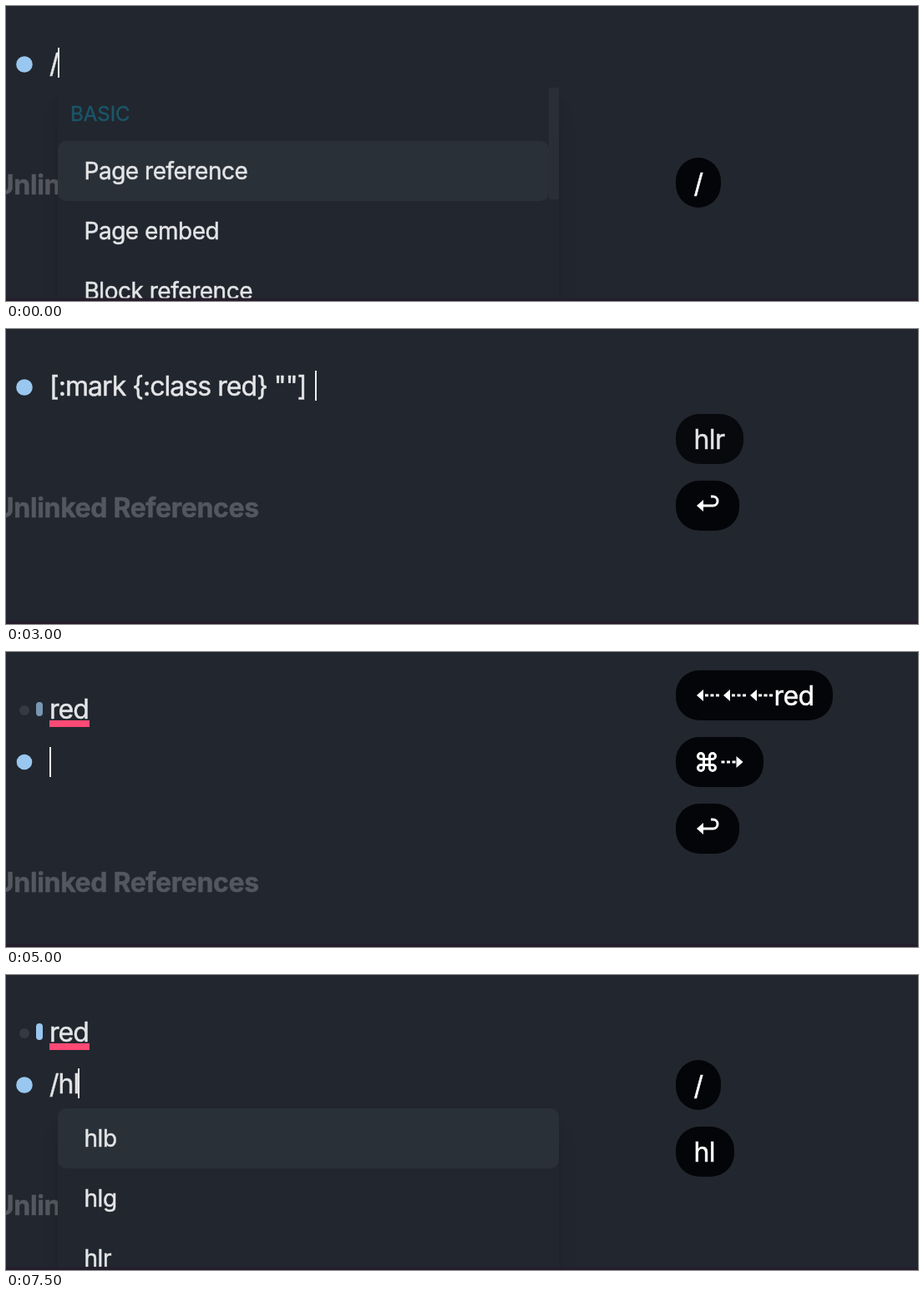
Recreate the animation shown at these times as an HTML page. Size 1092 by 354 pixels, loop 8 s.

```html
<!DOCTYPE html>
<html lang="en">
<head>
<meta charset="utf-8">
<title>Slash command typing</title>
<style>
  html, body { margin: 0; width: 100%; height: 100%; overflow: hidden; background: #22262e; }
  svg { display: block; width: 1092px; height: 354px; }
  text {
    font: 32px Inter, sans-serif; font-optical-sizing: none;
    letter-spacing: -.03em; white-space: pre;
    color: #e4e5e7; fill: currentColor; stroke: currentColor; stroke-width: .5px;
  }
  .item { font-size: 28px; letter-spacing: -.017em; }
  .group { font-size: 24px; letter-spacing: 0; color: #1b5568; }
  .heading { font-weight: 700; letter-spacing: -.011em; color: #54575f; text-anchor: end; }
  .key text { color: #fff; letter-spacing: -.02em; }
  .key path { fill: none; stroke: #fff; stroke-width: 3; }
  .key .head { fill: #fff; stroke: none; }
</style>
</head>
<body>
<svg viewBox="0 0 1092 354">
  <defs>
    <filter id="wide" x="-20%" y="-50%" width="140%" height="200%"><feGaussianBlur stdDeviation="15"/></filter>
    <filter id="tight" x="-20%" y="-50%" width="140%" height="200%"><feGaussianBlur stdDeviation="6"/></filter>
  </defs>
  <rect width="1092" height="354" fill="#22262e"/>
  <g id="scene"></g>
  <rect y="350.5" width="1092" height="3.5" fill="#261d2c"/>
</svg>
<script>
const STEP = 500, BLUE = '#99c7ef', ROW = 62;
const scene = document.getElementById('scene');

const rect = (x, y, w, h, fill, rx = 0, extra = '') =>
  `<rect x="${x}" y="${y}" width="${w}" height="${h}" rx="${rx}" fill="${fill}" ${extra}/>`;
const label = (x, y, str, cls = '') => `<text x="${x}" y="${y}" class="${cls}">${str}</text>`;
const dot = (y, r, fill) => `<circle cx="22" cy="${y}" r="${r}" fill="${fill}"/>`;

// Key glyphs, relative to the top left corner of their bubble
const leftArrow = x =>
  `<path class="head" d="M${x} 30l8-7v14z"/><path d="M${x + 10} 30h17" stroke-dasharray="4 2.5"/>`;
const leftArrows = [25, 57, 89].map(leftArrow).join('');
const command = `<path d="M33.5 26.5V23a3.5 3.5 0 1 0-3.5 3.5H44a3.5 3.5 0 1 0-3.5-3.5V37
  a3.5 3.5 0 1 0 3.5-3.5H30a3.5 3.5 0 1 0 3.5 3.5Z" stroke-width="2.7"/>`;
const rightArrow = '<path d="M54.5 30h17" stroke-dasharray="4 2.5"/><path class="head" d="M80.5 30l-8-7v14z"/>';
const typed = str => label(21.5, 42, str);

const KEYS = {
  slash: [54, typed('/')],
  h: [62, typed('h')],
  hl: [70, typed('hl')],
  hlr: [81, typed('hlr')],
  enter: [76, '<path class="head" d="M25 30l8-7v14z"/><path d="M32 30H44.5a5.5 5.5 0 0 0 0-11H42"/>'],
  lefts: [140, leftArrows],
  leftsRed: [188, leftArrows + label(117.5, 42, 'red')],
  lineEnd: [105, command + rightArrow],
};

// Newest bubble sits at the bottom; "name:opacity" marks a fading one
function bubble(spec, age) {
  const [name, opacity = 1] = spec.split(':');
  const [width, glyph] = KEYS[name];
  return `<g class="key" transform="translate(802 ${182 - 80 * age})" opacity="${opacity}">
    ${rect(0, 0, width, 60, '#040508', 28)}${glyph}</g>`;
}

function menu(items, y) {
  const full = items === 'all';
  const h = full ? 600 : items.length * 72;
  let out = rect(68, y + 26, 588, h - 12, '#000', 10, 'opacity=".1" filter="url(#wide)"')
    + rect(66, y + 12, 592, h - 8, '#000', 10, 'opacity=".05" filter="url(#tight)"')
    + rect(62, y, 600, h, '#22262e', 10);
  let top = y;
  if (full) {
    out += label(77, y + 40, 'BASIC', 'group') + rect(650, y, 12, 134, '#2a2e36');
    items = ['Page reference', 'Page embed', 'Block reference'];
    top += 64;
  }
  out += rect(62, top, full ? 588 : 600, 72, '#2a3038', 10);
  return out + items.map((item, i) => label(93.5, top + 46 + 72 * i, item, 'item')).join('');
}

const hlItems = ['hlb', 'hlg', 'hlr'];
const mark = word => `[:mark {:class red} "${word}"] `;

// text, caret x (0 = hidden), bubbles from newest to oldest, menu items
const first = [
  ['/', 62, ['slash'], 'all'],
  ['/h', 80, ['h', 'slash'], [...hlItems, 'Highlight']],
  ['/hlr', 98, ['hlr', 'slash'], hlItems],
  ['/hlr', 0, ['hlr', 'slash'], ['hlr']],
  [mark(''), 370, ['enter', 'hlr']],
  [mark(''), 0, ['enter', 'hlr']],
  [mark(''), 370, ['enter', 'hlr:.87']],
  [mark(''), 336, ['lefts', 'enter']],
  [mark('red'), 384, ['leftsRed', 'enter:.56']],
  [mark('red'), 418, ['lineEnd', 'leftsRed']],
];
const second = [
  ['', 52, ['enter', 'lineEnd', 'leftsRed']],
  ['', 0, ['enter', 'lineEnd', 'leftsRed']],
  ['/', 62, ['slash', 'enter', 'lineEnd', 'leftsRed:.8'], 'all'],
  ['/hl', 86, ['hl', 'slash', 'enter'], hlItems],
  ['/hl', 0, ['hl', 'slash', 'enter:.3'], hlItems],
  ['/hl', 86, ['hl', 'slash'], hlItems],
];
const states = [...first, ...second];

function draw(step) {
  const [text, caret, keys, items] = states[step];
  const onSecond = step >= first.length, settling = step === first.length;
  const dy = onSecond ? ROW : 0;
  let out = label(302.7, 226 + dy, 'Unlinked References', 'heading');
  if (onSecond) {
    out += dot(70, 6, '#353941')
      + (settling ? rect(36, 60, 8, 17, '#7897b3', 4) : rect(36, 58, 8, 20, BLUE, 4))
      + rect(52, 82, 48, 8, '#fe4a74') + label(52, 80, 'red');
  }
  out += dot(70 + dy, settling ? 9.3 : 9.8, BLUE) + label(52, 80 + dy, text);
  if (items) out += menu(items, 98 + dy);
  if (caret) out += rect(caret, (text ? 50 : 52) + dy, 2, 36, '#eceded');
  scene.innerHTML = out + keys.map(bubble).join('');
}

let shown = -1;
function tick() {
  const step = Math.floor(performance.now() / STEP) % states.length;
  if (step !== shown) draw(shown = step);
  requestAnimationFrame(tick);
}
tick();
</script>
</body>
</html>
```
